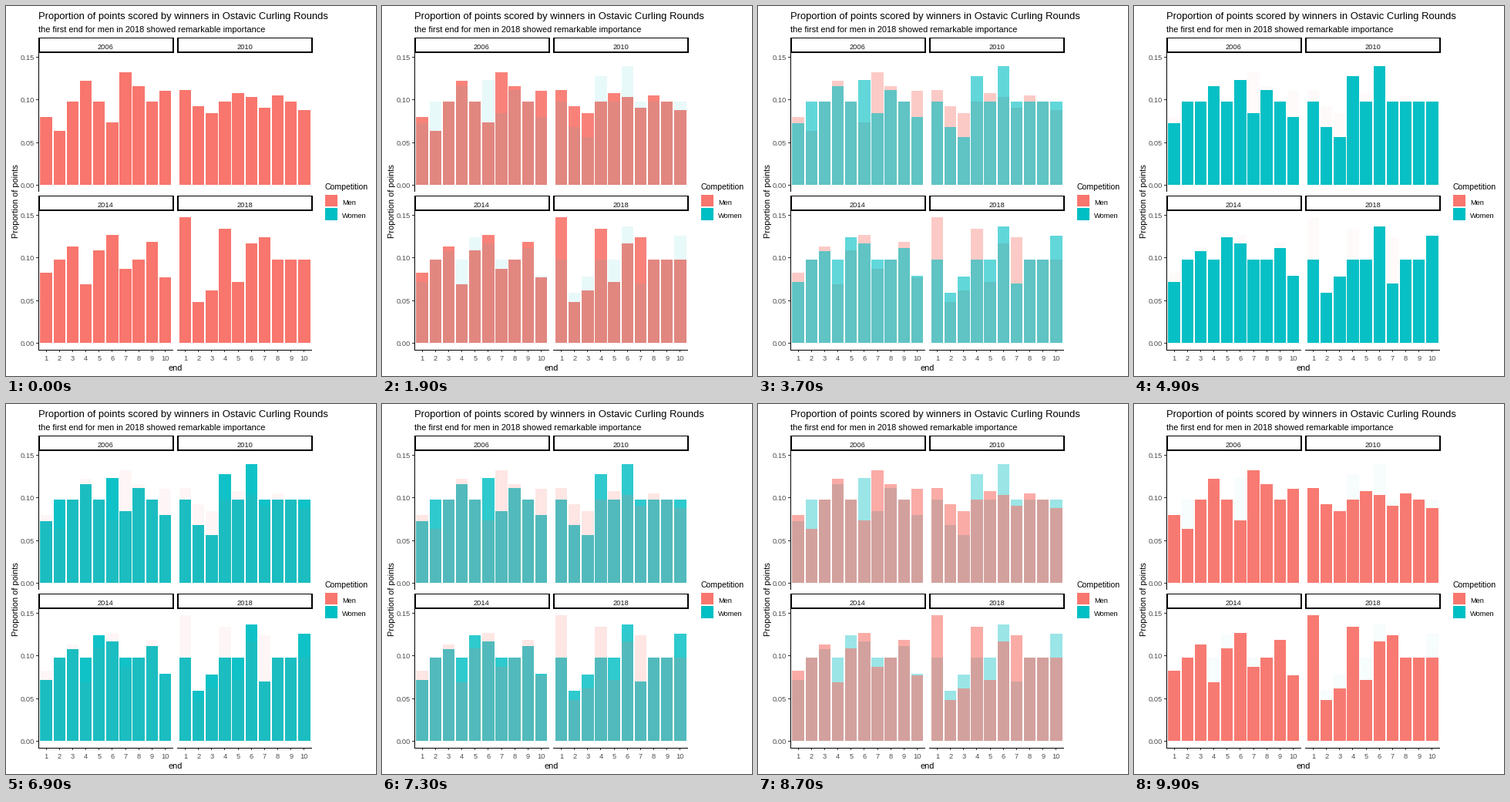
Recreate the animation shown at these times as a matplotlib script. Size 480 by 480 pixels, loop 10 s.

```python
import matplotlib.pyplot as plt
from matplotlib.animation import FuncAnimation
from matplotlib.patches import Rectangle

SIZE, DPI = 480, 100
MEN, WOMEN = "#F8766D", "#00BFC4"
GREY = "#4D4D4D"
SMALL = 9.3                      # pixel size of tick, strip and key labels

PANEL_X = (41.8, 222.2)          # left edge of each panel column
PANEL_W = 175
UNIT = PANEL_W / 10.2            # one bar slot, with 0.6 padding at both ends
BASE_Y = (232, 437)              # zero line of each panel row
SCALE = 1107                     # pixels per unit of proportion

# Bars stand at the typical height, except for peaks and dips. These are
# listed strongest first; each one departs less than the one before it.
TYPICAL, DECAY = 108, 0.72
YEARS = ("2006", "2010", "2014", "2018")
# per year: largest departure, ends that peak, ends that dip
MEN_ENDS = (
    (38, (7, 4, 8, 10), (2, 6, 1)),
    (15, (1, 5, 8, 6), (3, 10, 7, 2)),
    (32, (6, 9, 3, 5), (4, 10, 1, 7)),
    (55, (1, 4, 7, 6), (2, 3, 5)),
)
WOMEN_ENDS = (
    (28, (6, 4, 8), (1, 10, 7)),
    (46, (6, 4), (3, 2)),
    (29, (5, 6, 9, 3), (1, 10)),
    (43, (6, 10), (2, 7, 3)),
)

plt.rcParams["font.family"] = "Liberation Sans"
fig = plt.figure(figsize=(SIZE / DPI, SIZE / DPI), dpi=DPI, facecolor="white")
ax = fig.add_axes([0, 0, 1, 1])
ax.set_xlim(0, SIZE)
ax.set_ylim(SIZE, 0)
ax.axis("off")


def box(x0, y0, x1, y1, color, z=1):
    rect = Rectangle((x0, y0), x1 - x0, y1 - y0, facecolor=color, lw=0, zorder=z)
    return ax.add_patch(rect)


def label(x, y, text, px, color="black", **kw):
    ax.text(x, y, text, fontsize=px * 72 / DPI, color=color,
            va=kw.pop("va", "baseline"), zorder=6, **kw)


def bar_heights(spread, peaks, dips):
    heights = [TYPICAL] * 10
    for sign, ends in ((1, peaks), (-1, dips)):
        for rank, end in enumerate(ends):
            heights[end - 1] += sign * round(spread * DECAY ** rank)
    return heights


def make_bars(years, color):
    bars = []
    for i, shape in enumerate(years):
        left, base = PANEL_X[i % 2], BASE_Y[i // 2]
        for j, h in enumerate(bar_heights(*shape)):
            x0 = round(left + (j + 0.15) * UNIT)
            x1 = round(left + (j + 1.05) * UNIT)
            bars.append(box(x0, base - h, x1, base, color))
    return bars


def draw_strip(i):
    left = PANEL_X[i % 2]
    x0, y0 = round(left), BASE_Y[i // 2] - 191
    box(x0, y0, x0 + 176, y0 + 20, "black", 4)
    box(x0 + 2, y0 + 1, x0 + 174, y0 + 18, "white", 5)
    label(left + PANEL_W / 2, y0 + 15, YEARS[i], SMALL, "#1A1A1A", ha="center")


def draw_axes():
    for base in BASE_Y:
        box(42, base - 172, 43, base + 9, "black", 3)
        for v in (0, 0.05, 0.10, 0.15):
            y = round(base - v * SCALE)
            box(39, y, 42, y + 1, "#333333", 3)
            label(37, y + 4, f"{v:.2f}", SMALL, GREY, ha="right")
    for left in PANEL_X:
        x0 = round(left)
        box(x0, 446, x0 + PANEL_W, 447, "black", 3)
        for j in range(10):
            x = left + (j + 0.6) * UNIT
            box(int(x), 447, int(x) + 1, 449, "#333333", 3)
            label(x, 460, str(j + 1), SMALL, GREY, ha="center")


def draw_legend():
    label(414, 238, "Competition", 10.5)
    for y0, y1, name, color in ((245, 260, "Men", MEN), (262, 278, "Women", WOMEN)):
        box(414, y0, 430, y1, color)
        label(436, y0 + 13, name, SMALL)


men = make_bars(MEN_ENDS, MEN)
women = make_bars(WOMEN_ENDS, WOMEN)
for n in range(4):
    draw_strip(n)
draw_axes()
draw_legend()
label(42, 17, "Proportion of points scored by winners in Ostavic Curling Rounds", 13)
label(42, 34, "the first end for men in 2018 showed remarkable importance", 11)
label(220, 473, "end", 11, ha="center")
label(18, 253, "Proportion of points", 11, rotation=90, ha="right", va="center")

# ticks (100 ms each) at which the fade takes its next step
STEPS = [0, *range(19, 50, 3), *range(69, 82, 2), *range(84, 100, 3)]


def update(k):
    s = max(c for c in STEPS if c <= k)
    if s < 17:
        share = 0
    elif s <= 50:
        share = (s - 16) / 34
    else:
        share = 1 - (s - 67) / 33
    # the group that is fading in lies on top
    men_z, women_z = (1, 2) if s <= 50 else (2, 1)
    for group, alpha, z in ((men, 1 - share, men_z), (women, share, women_z)):
        for bar in group:
            bar.set_alpha(alpha)
            bar.set_zorder(z)
    return men + women


anim = FuncAnimation(fig, update, frames=100, interval=100, repeat=True, blit=False)
plt.show()
```
